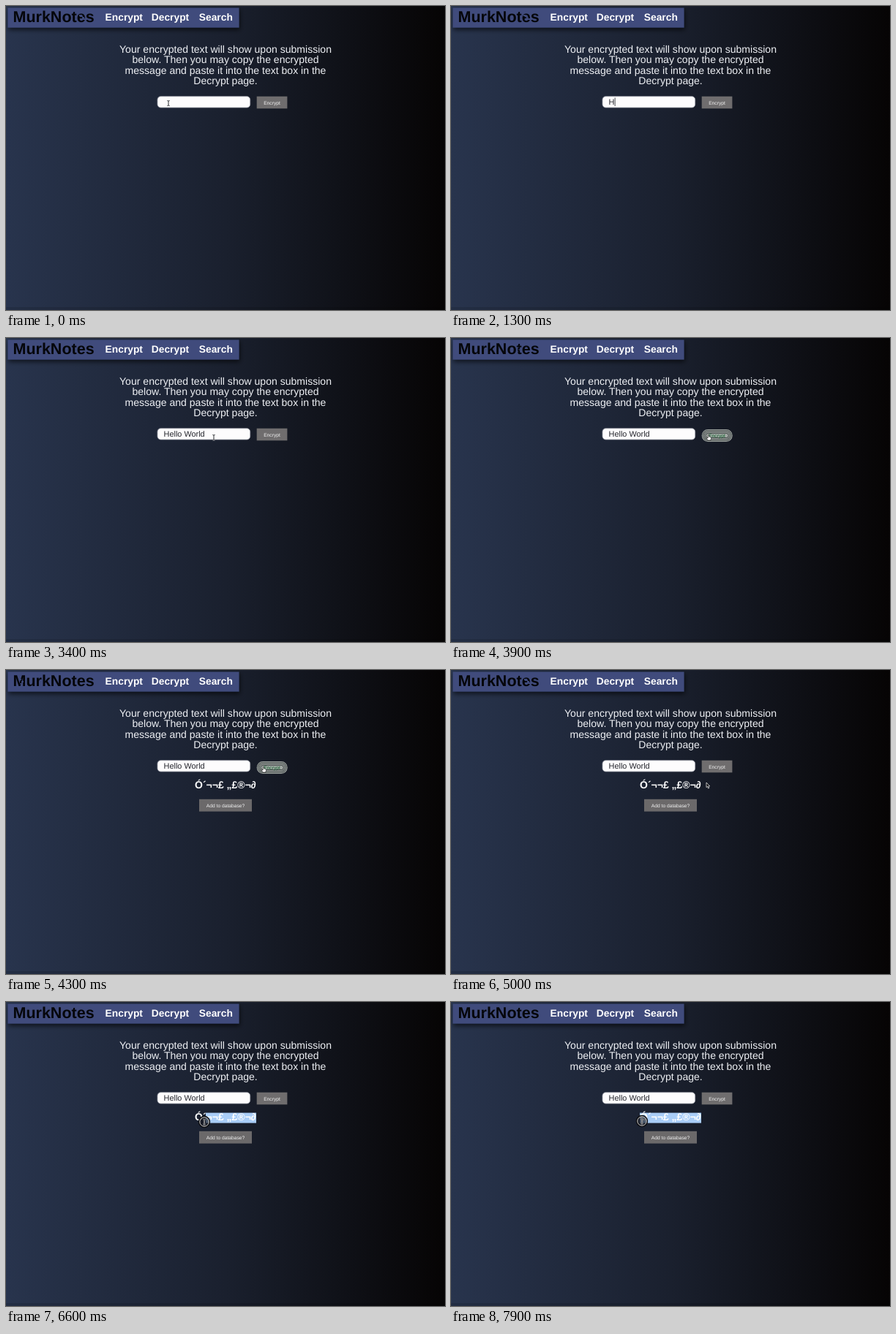
Recreate the animation shown at these times as an HTML page. Size 600x416 px, loop 8 s.

```html
<!DOCTYPE html>
<html lang="en">
<head>
<meta charset="utf-8">
<title>Encrypt</title>
<style>
  html, body { margin: 0; width: 100%; height: 100%; overflow: hidden; background: #0b0b0e; }
  svg { display: block; width: 100vw; height: 100vh; }
  text { white-space: pre; font-family: "Liberation Sans", Arial, sans-serif; text-rendering: geometricPrecision; }
  .bold { font-weight: 700; }
  .label { font-size: 6.7px; fill: #f2f2f2; text-anchor: middle; }
</style>
</head>
<body>
<svg viewBox="0 0 600 416" preserveAspectRatio="none">
  <defs>
    <linearGradient id="night">
      <stop offset="0" stop-color="#28344d"/>
      <stop offset=".5" stop-color="#1a202e"/>
      <stop offset="1" stop-color="#060404"/>
    </linearGradient>
    <filter id="shadow" x="-10%" y="-30%" width="120%" height="190%">
      <feDropShadow dx="1" dy="3" stdDeviation="3" flood-color="#000" flood-opacity=".65"/>
    </filter>
  </defs>
  <rect width="600" height="416" fill="url(#night)"/>
  <rect y="412" width="600" height="4" fill="#000" opacity=".12"/>

  <rect x="2.5" y="2.5" width="316" height="27" fill="#3f4b7c" filter="url(#shadow)"/>
  <text class="bold" x="9.5" y="22" font-size="21.5" fill="#05060a">MurkNotes</text>
  <g id="glint" fill="#3f4b7c">
    <rect x="-3" y="-2" width="4" height="2"/>
    <rect x="1" y="1" width="3" height="2"/>
    <rect x="-1" y="4" width="2" height="1.5"/>
  </g>
  <g class="bold" font-size="13.8" fill="#fff">
    <text x="135.6" y="20">Encrypt</text>
    <text x="198.8" y="20">Decrypt</text>
    <text x="263.8" y="20">Search</text>
  </g>

  <g font-size="14.05" fill="#eef0f4" text-anchor="middle">
    <text x="300" y="63.8">Your encrypted text will show upon submission</text>
    <text x="300" y="78.2">below. Then you may copy the encrypted</text>
    <text x="300" y="92.6">message and paste it into the text box in the</text>
    <text x="300" y="107">Decrypt page.</text>
  </g>

  <rect x="207" y="123.7" width="126.7" height="15.3" rx="4.5" fill="#fdfcfd" stroke="#9a9ca6" stroke-width=".8"/>
  <text id="typed" x="215.6" y="134.8" font-size="10.9" fill="#24252c"></text>
  <rect id="caret" y="125.5" width=".9" height="11.5" fill="#33343a"/>

  <g id="button">
    <rect x="342.7" y="123.7" width="41.7" height="16.6" fill="#6f6d6e"/>
    <text class="label" x="363.5" y="134.5">Encrypt</text>
  </g>
  <g id="hovered">
    <g id="rings"></g>
    <text class="label" x="363.5" y="135.8" style="fill:#0b5f28">Encrypt</text>
  </g>

  <g id="result">
    <rect id="selection" y="151.6" height="14" fill="#a9cdf7"/>
    <text class="bold" x="258" y="162.3" font-size="14" fill="#fff">Ó´¬¬£ „£®¬∂</text>
    <rect x="264" y="176.8" width="72" height="16.8" fill="#6b696a"/>
    <text class="label" x="300" y="187.5">Add to database?</text>
  </g>

  <g id="cursor">
    <g id="press">
      <circle r="7.2" fill="#15171f" fill-opacity=".65" stroke="#0b0c10" stroke-width="2"/>
      <circle r="6.2" fill="none" stroke="#e9e6e0" stroke-width=".9"/>
    </g>
    <g id="beam" fill="none">
      <path d="M-1.6-3.5Q0-3.5 0-2.5Q0-3.5 1.6-3.5M0-2.5V2.5M-1.6 3.5Q0 3.5 0 2.5Q0 3.5 1.6 3.5" stroke="#fff" stroke-width="1.7"/>
      <path d="M-1.6-3.5Q0-3.5 0-2.5Q0-3.5 1.6-3.5M0-2.5V2.5M-1.6 3.5Q0 3.5 0 2.5Q0 3.5 1.6 3.5" stroke="#16171c" stroke-width=".9"/>
    </g>
    <path id="arrow" d="M0 0V6.6L1.5 5.3L2.6 8L3.8 7.5L2.7 4.9H4.7Z" fill="#0b0b0d" stroke="#fff" stroke-width=".7"/>
    <path id="hand" d="M-.8-3.5Q0-4.3 .6-3.5V-1L3-.4Q3.8 0 3.5 1.2L2.8 4H-.8L-3 .8Q-2.6-.3-.8 1Z" fill="#fff" stroke="#111" stroke-width=".6"/>
  </g>
</svg>
<script>
  const LOOP = 8000, STEP = 100;
  const MESSAGE = "Hello World";
  const TYPE_START = 1200, TYPE_STEP = 130;
  const TYPE_END = TYPE_START + TYPE_STEP * MESSAGE.length;
  const HOVER_START = 3900, CLICK = 4200, HOVER_END = 4700, DRAG_START = 6350;

  // time, x, y
  const PATH = [
    [0, 222, 133], [500, 222, 133], [900, 223, 135], [2800, 223, 135],
    [3400, 284, 136], [3600, 335, 141], [3850, 352, 136], [4600, 352, 136],
    [5000, 349, 154], [5300, 352, 166], [5700, 350, 161], [6200, 342, 160],
    [DRAG_START, 341, 161], [6600, 271, 164], [7000, 262, 163],
    [7400, 259, 165], [7900, 261, 163]
  ];

  const el = {};
  document.querySelectorAll("[id]").forEach(node => el[node.id] = node);
  const show = (node, visible) => node.style.display = visible ? "" : "none";
  const place = (node, x, y) => node.setAttribute("transform", `translate(${x} ${y})`);

  function addRings() {
    for (let i = 0; i < 7; i++) {
      const ring = document.createElementNS("http://www.w3.org/2000/svg", "rect");
      const size = { x: 342.7 + i, y: 125 + i, width: 42 - 2 * i, height: 17 - 2 * i, rx: 8.5 - i };
      for (const key in size) ring.setAttribute(key, size[key]);
      ring.setAttribute("fill", i % 2 ? "#454b4b" : "#a3a9a5");
      el.rings.append(ring);
    }
  }

  function cursorAt(t) {
    const next = PATH.findIndex(point => point[0] > t);
    if (next < 0) return PATH[PATH.length - 1].slice(1);
    const [t0, x0, y0] = PATH[next - 1], [t1, x1, y1] = PATH[next];
    const k = (t - t0) / (t1 - t0), ease = k * k * (3 - 2 * k);
    return [x0 + (x1 - x0) * ease, y0 + (y1 - y0) * ease];
  }

  // The glint is visible only near the ends of its sweep.
  function drawGlint(t) {
    const swing = Math.cos(t / 1250 * 2 * Math.PI);
    place(el.glint, 60 + 43 * swing, 14);
    el.glint.setAttribute("opacity", swing * swing);
  }

  function drawInput(t) {
    const count = t < TYPE_START ? 0 : Math.floor((t - TYPE_START) / TYPE_STEP) + 1;
    el.typed.textContent = MESSAGE.slice(0, count);
    const width = count ? el.typed.getComputedTextLength() : 0;
    el.caret.setAttribute("x", 215.8 + width);
    const blinkOn = t < TYPE_END || (t - TYPE_END) % 1000 < 500;
    show(el.caret, t >= 1000 && t < HOVER_START && blinkOn);
  }

  function drawCursor(t) {
    const [x, y] = cursorAt(t);
    const hover = t >= HOVER_START && t < HOVER_END;
    const pressed = t >= DRAG_START;
    const beam = pressed || t < 3600 || (t >= 5900 && x < 347);
    place(el.cursor, x, y);
    show(el.cursor, t < TYPE_START || t >= 2800);
    show(el.press, pressed);
    show(el.beam, beam);
    show(el.hand, hover);
    show(el.arrow, !beam && !hover);
    show(el.button, !hover);
    show(el.hovered, hover);

    const left = x < 266 ? 258 : Math.min(342, x + 2);
    show(el.selection, pressed);
    el.selection.setAttribute("x", left);
    el.selection.setAttribute("width", 342 - left);
  }

  function draw(t) {
    drawGlint(t);
    drawInput(t);
    show(el.result, t >= CLICK);
    drawCursor(t);
  }

  function frame(now) {
    draw(Math.floor((now % LOOP) / STEP) * STEP);
    requestAnimationFrame(frame);
  }

  addRings();
  draw(0);
  requestAnimationFrame(frame);
</script>
</body>
</html>
```
